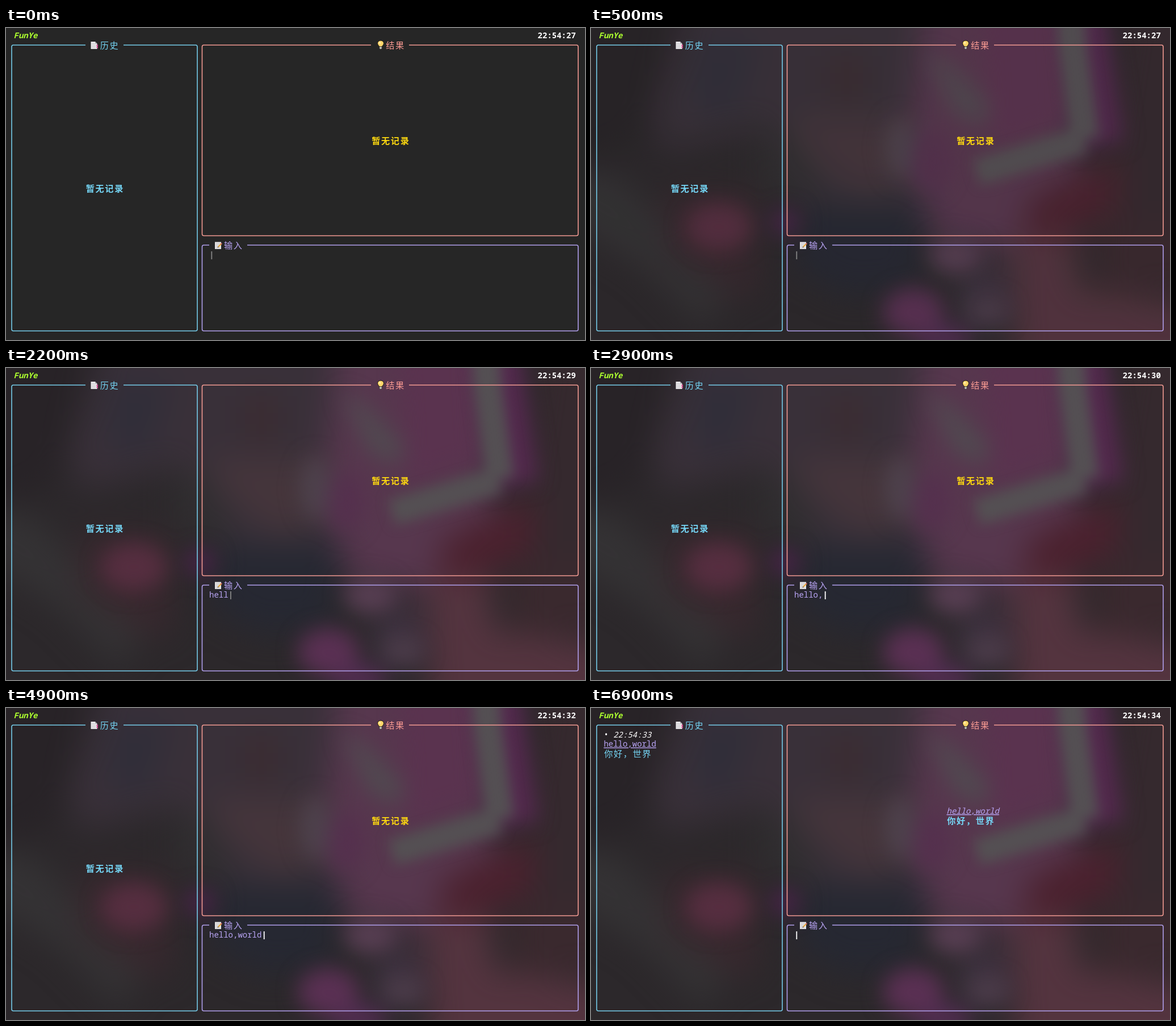
These frames come from a looping animation (1020x549 px, 7.1 s). An HTML page:

```html
<!DOCTYPE html>
<html lang="zh-CN">
<head>
<meta charset="utf-8">
<title>FunYe</title>
<style>
  html, body { margin: 0; width: 100%; height: 100%; overflow: hidden; background: #262626; }
  svg { display: block; width: 100%; height: 100%; }
  text { font: 14px "Noto Sans Mono", "DejaVu Sans Mono", monospace; white-space: pre; }
  .cjk { font: 300 15.2px "Noto Sans CJK SC", "Noto Sans CJK", sans-serif; letter-spacing: 1.6px; }
  .bold { font-weight: 700; }
  .italic { font-style: italic; }
  .link { text-decoration: underline; }
  .blue { fill: #75d6f6; }
  .coral { fill: #fb9b93; }
  .violet { fill: #b9a5f5; }
  .gold { fill: #ffd90f; }
  .lime { fill: #adff2f; }
  .white { fill: #fff; }
  .panel { fill: none; stroke-width: 1.6; }
</style>
</head>
<body>
<svg viewBox="0 0 1020 549" preserveAspectRatio="none">
  <defs>
    <filter id="wide" filterUnits="userSpaceOnUse" x="-150" y="-150" width="1320" height="849" color-interpolation-filters="sRGB"><feGaussianBlur stdDeviation="28"/></filter>
    <filter id="mid" filterUnits="userSpaceOnUse" x="-150" y="-150" width="1320" height="849" color-interpolation-filters="sRGB"><feGaussianBlur stdDeviation="18"/></filter>
    <filter id="near" filterUnits="userSpaceOnUse" x="-150" y="-150" width="1320" height="849" color-interpolation-filters="sRGB"><feGaussianBlur stdDeviation="11"/></filter>
  </defs>
  <rect width="1020" height="549" fill="#262626"/>

  <g id="wall">
    <rect width="1020" height="549" fill="#2c282b"/>
    <g filter="url(#wide)">
      <path fill="#282327" d="M-90-90H170L90 200 0 240H-90Z"/>
      <path fill="#393039" d="M190-90H640V330H370L310 170 130 215 110 150Z"/>
      <path fill="#302e39" d="M190 20H290L250 150 180 140Z"/>
      <path fill="#3a2b30" d="M420 50H480V130H420Z"/>
      <path fill="#45353b" d="M350 160H560V250L490 300 390 220Z"/>
      <path fill="#343234" d="M-60 230L60 270 240 470 200 530 90 420-60 330Z"/>
      <path fill="#302e30" d="M300 170L350 190 410 300 300 290Z"/>
      <path fill="#38282e" d="M130 290H290V470H250L130 390Z"/>
      <path fill="#262832" d="M370 310H590L575 455 450 470 360 420Z"/>
      <path fill="#57374e" d="M590-90H860V340L760 400 600 370 560 200Z"/>
      <path fill="#35292e" d="M950-90H1110V400H940L900 250Z"/>
      <path fill="#4b212e" d="M770 300L930 225 930 320 840 365 760 370Z"/>
      <path fill="#54343f" d="M740 375L850 360 860 460 1110 500V640H750Z"/>
      <path fill="#3a292e" d="M890 340H1110V470H890Z"/>
      <path fill="#3f3241" d="M650 420H730V520H650Z"/>
    </g>
    <g filter="url(#mid)">
      <ellipse cx="225" cy="350" rx="58" ry="42" fill="#562e40"/>
      <ellipse cx="342" cy="342" rx="26" ry="24" fill="#482348"/>
      <ellipse cx="545" cy="212" rx="26" ry="55" fill="#4d424c"/>
      <ellipse cx="598" cy="235" rx="32" ry="52" fill="#55304e"/>
      <ellipse cx="642" cy="400" rx="46" ry="32" fill="#573e52"/>
      <ellipse cx="568" cy="500" rx="54" ry="42" fill="#5a3053"/>
      <ellipse cx="622" cy="548" rx="50" ry="28" fill="#502d50"/>
      <ellipse cx="700" cy="497" rx="36" ry="22" fill="#4d3d4b"/>
      <path fill="none" stroke="#54294e" stroke-width="86" stroke-linejoin="round" d="M858-60L896 206"/>
      <path fill="#5a334f" d="M690-60H815L830 160 710 200Z"/>
      <path fill="#514850" d="M590 40L640 70 705 140 690 170 640 150Z"/>
    </g>
    <g filter="url(#near)" fill="none" stroke="#545053" stroke-linejoin="round">
      <path stroke-width="50" d="M843-50L848 30 870 195"/>
      <path stroke-width="46" d="M868 197L680 254"/>
    </g>
  </g>

  <path class="panel" stroke="#75cbe9" d="M140 30H13Q10 30 10 33V530Q10 533 13 533H334Q337 533 337 530V33Q337 30 334 30H207"/>
  <path class="panel" stroke="#f29a92" d="M643 30H348.500Q345.500 30 345.500 33V362Q345.500 365.500 348.500 365.500H1005Q1008 365.500 1008 362V33Q1008 30 1005 30H710"/>
  <path class="panel" stroke="#b09eeb" d="M358 382H348.500Q345.500 382 345.500 385V530Q345.500 533 348.500 533H1005Q1008 533 1008 530V385Q1008 382 1005 382H425"/>

  <!-- page with tabs -->
  <g transform="translate(149 24)">
    <path fill="#c93e86" d="M9 5H12.500V8H9ZM9 8.500H13V11.500H9Z"/>
    <path fill="#e9e7e9" d="M.5 0H8L11.500 3.500V13H.5Z"/>
    <path fill="#aaa7ad" d="M8 0V3.500H11.500Z"/>
    <path stroke="#c5c4cb" stroke-width=".8" d="M2 3.500H7M2 6H9M2 8.500H9M2 11H9"/>
    <path fill="#d64b91" d="M10.500 5.500H13V8H10.500ZM10.500 9H13V11H10.500Z"/>
  </g>
  <!-- bulb -->
  <g transform="translate(660 29)">
    <path fill="#ffd66b" stroke="#171717" stroke-width="1" d="M-2.500 4C-2.500 2-5.500 1-5.500-2A5.500 5 0 0 1 5.500-2C5.500 1 2.500 2 2.500 4Z"/>
    <path fill="#c9c7c0" stroke="#171717" stroke-width=".6" d="M-2.200 4H2.200V7L1 8.200H-1L-2.200 7Z"/>
    <ellipse cx="-1.500" cy="-3" rx="1.800" ry="1.500" fill="#fff0b5"/>
  </g>
  <!-- memo -->
  <g transform="translate(367.500 376.500)">
    <path fill="#e6e4e4" d="M.5 0H11.500V12.500H.5Z"/>
    <path stroke="#bcbcc2" stroke-width=".8" d="M2 3H10M2 5.500H8M2 8H7M2 10.500H9"/>
    <path stroke="#e9aa3d" stroke-width="2.400" d="M6.500 8.500L11.500 3.500"/>
    <path stroke="#d66c68" stroke-width="2.400" d="M11 4L12.700 2.300"/>
    <path fill="#554b45" d="M5 10L5.700 7.700 7.300 9.300Z"/>
  </g>

  <text class="cjk blue" x="165.800" y="35.700">历史</text>
  <text class="cjk coral" x="669.300" y="35.700">结果</text>
  <text class="cjk violet" x="384" y="387.500">输入</text>
  <text class="lime bold italic" x="13.500" y="18">FunYe</text>
  <text class="white bold" id="clock" x="936.600" y="18"></text>

  <g id="empty">
    <text class="cjk blue bold" x="140.800" y="287.500">暂无记录</text>
    <text class="cjk gold bold" x="644.300" y="203.500">暂无记录</text>
  </g>
  <g id="answer">
    <text class="white" x="22.400" y="51.700">•</text>
    <text class="white italic" x="39.200" y="51.700">22:54:33</text>
    <text class="violet link" x="22.400" y="68.400">hello,world</text>
    <text class="cjk blue" x="23.200" y="86">你好，世界</text>
    <text class="violet italic link" x="626.500" y="186">hello,world</text>
    <text class="cjk blue bold" x="627.300" y="203.500">你好，世界</text>
  </g>

  <text class="violet" id="typed" x="358" y="403.500"></text>
  <rect id="caret" y="393" width="1.800" height="14"/>
</svg>
<script>
  const LOOP = 7100, SUBMIT = 5300, CELL = 8.4;
  const WORD = 'hello,world';
  const keys = [1600, 1800, 2000, 2200, 2500, 2900, 3400, 3500, 3700, 4000, 4100];
  const ticks = [900, 1800, 2700, 3700, 4600, 5500, 6400];
  const $ = id => document.getElementById(id);
  const passed = (times, t) => times.filter(at => at <= t).length;
  const show = (id, on) => $(id).setAttribute('visibility', on ? 'visible' : 'hidden');

  function wallAlpha(t) {
    if (t < 400) return 0;
    if (t < 500) return 0.03;
    return t < 600 ? 0.92 : 1;
  }

  function render(t) {
    const done = t >= SUBMIT;
    const count = done ? 0 : passed(keys, t);
    const lit = Math.floor((t + 100) / 1000) % 2 === 1;
    $('wall').setAttribute('opacity', wallAlpha(t));
    $('clock').textContent = '22:54:' + (27 + passed(ticks, t));
    $('typed').textContent = WORD.slice(0, count);
    $('caret').setAttribute('x', 361.4 + CELL * count);
    $('caret').setAttribute('fill', lit ? '#fff' : '#858585');
    show('empty', !done);
    show('answer', done);
  }

  const start = performance.now();
  function frame() {
    render((performance.now() - start) % LOOP);
    requestAnimationFrame(frame);
  }
  frame();
</script>
</body>
</html>
```
